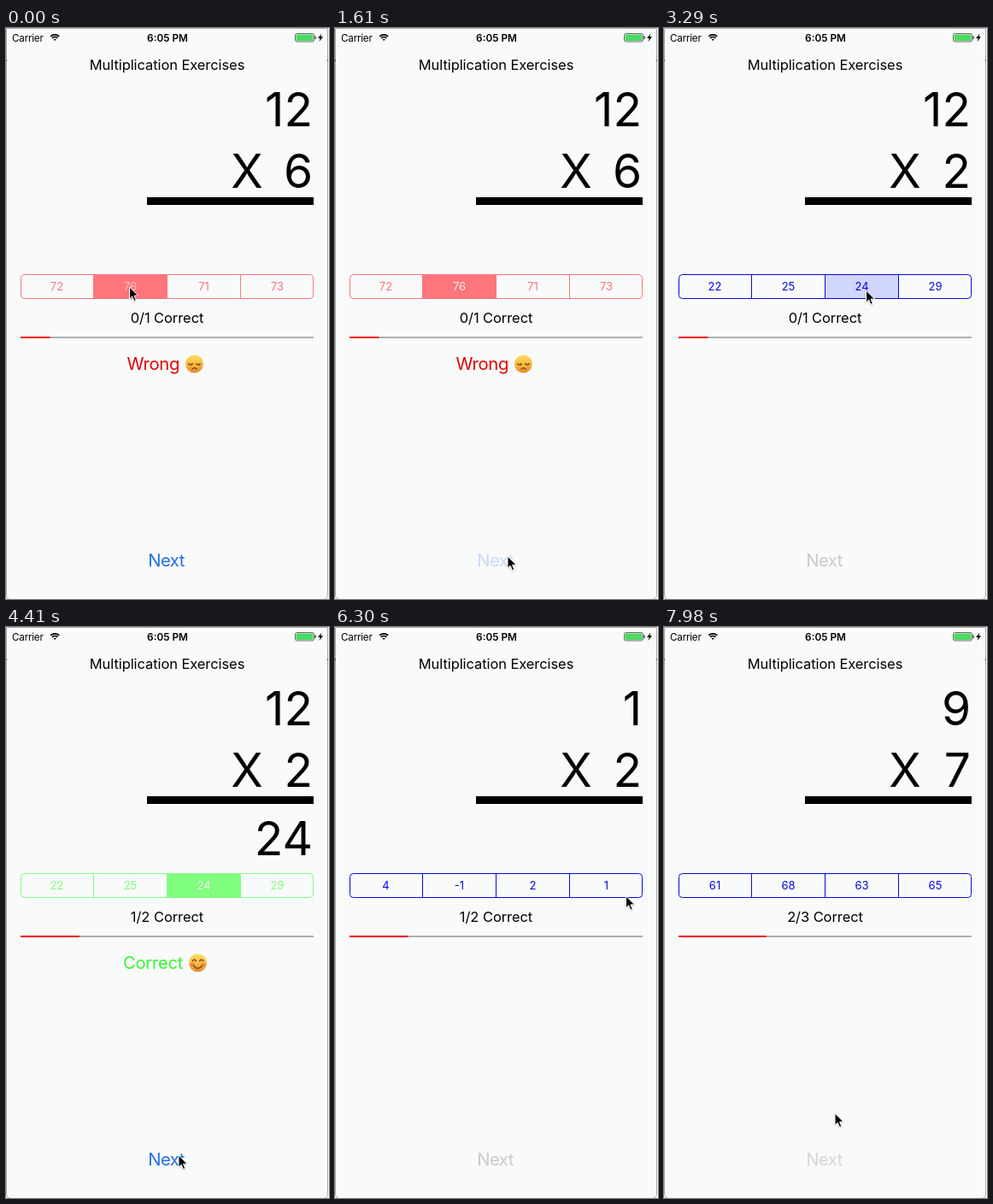
These frames come from a looping animation (378x668 px, 8 s). An HTML page with a canvas:

```html
<!DOCTYPE html>
<html lang="en">
<head>
<meta charset="utf-8">
<title>Multiplication Exercises</title>
<style>
  html, body { margin: 0; width: 100%; height: 100%; overflow: hidden; background: #fff; }
  canvas { display: block; width: 378px; height: 668px; }
</style>
</head>
<body>
<canvas id="stage"></canvas>
<script>
const W = 378, H = 668, LOOP = 8000;
const FONT = 'Inter, Roboto, sans-serif';
const PAPER = '#f9fbfb', BLUE = '#0808dc', RED = '#ff757b', GREEN = '#80ff80';
const LEFT = 17, RIGHT = 360, MID = 188.5, CELL = 86;
const PRESS_CHOICE = 210, PRESS_NEXT = 140;

const canvas = document.getElementById('stage');
const ctx = canvas.getContext('2d');
const ratio = window.devicePixelRatio || 1;
canvas.width = W * ratio;
canvas.height = H * ratio;

// Times are in ms; "picked" is the index of the chosen answer.
const rounds = [
  { start: 0, answer: 0, top: 12, bottom: 6, choices: [72, 76, 71, 73], picked: 1 },
  { start: 1680, answer: 3430, top: 12, bottom: 2, choices: [22, 25, 24, 29], picked: 2 },
  { start: 4830, answer: 6790, top: 1, bottom: 2, choices: [4, -1, 2, 1], picked: 2 },
  { start: 7700, answer: Infinity, top: 9, bottom: 7, choices: [61, 68, 63, 65], picked: 2 }
];
const isRight = r => r.choices[r.picked] === r.top * r.bottom;
const choiceX = i => 59.5 + CELL * i;

// Pointer stops; a stop with "until" rests there.
const atNext = { x: 202, y: 618 };
const path = [
  { at: 0, until: 140, x: choiceX(1) - 1, y: 303 },
  { at: 900, x: 330, y: 8 },
  { at: 1500, until: 1700, ...atNext },
  { at: 2120, x: 335, y: 9 },
  { at: 2500, x: 23, y: 290 },
  { at: 2850, x: 346, y: 120 },
  { at: 3180, until: 3440, x: choiceX(2) + 5, y: 307 },
  { at: 4150, until: 5070, ...atNext },
  { at: 5460, x: choiceX(3) + 12, y: 307 },
  { at: 6000, x: 92, y: 302 },
  { at: 6330, x: 346, y: 315 },
  { at: 6560, until: 6740, x: choiceX(2) - 12, y: 307 },
  { at: 7360, until: 7750, ...atNext },
  { at: LOOP, x: 200, y: 568 }
];

const clamp = v => Math.max(0, Math.min(1, v));

function pointerAt(t) {
  const i = path.findIndex(stop => stop.at > t);
  const a = path[i - 1], b = path[i], leave = a.until ?? a.at;
  const u = clamp((t - leave) / (b.at - leave)), k = u * u * (3 - 2 * u);
  return [a.x + (b.x - a.x) * k, a.y + (b.y - a.y) * k];
}

function text(value, x, y, size, { color = '#000', align = 'center', weight = 400, tracking = 0 } = {}) {
  ctx.font = `${weight} ${size}px ${FONT}`;
  ctx.letterSpacing = `${tracking * size}px`;
  ctx.textAlign = align;
  ctx.fillStyle = color;
  ctx.fillText(value, x, y);
}

function rect(x, y, w, h, color) {
  ctx.fillStyle = color;
  ctx.fillRect(x, y, w, h);
}

function roundRect(x, y, w, h, r) {
  ctx.beginPath();
  ctx.roundRect(x, y, w, h, r);
}

function polygon(points, color) {
  ctx.beginPath();
  points.forEach(([x, y]) => ctx.lineTo(x, y));
  ctx.closePath();
  ctx.fillStyle = color;
  ctx.fill();
}

function arc(x, y, r, from, to) {
  ctx.beginPath();
  ctx.arc(x, y, r, from * Math.PI, to * Math.PI);
  ctx.stroke();
}

function drawScreen() {
  rect(0, 0, W, H, '#fff');
  roundRect(0.5, 0.5, 376, H, [0, 0, 5, 5]);
  ctx.fillStyle = PAPER;
  ctx.fill();
  ctx.strokeStyle = '#a4a6a7';
  ctx.lineWidth = 1;
  ctx.stroke();
  rect(0, 37, 1, 2, '#555');
  rect(376, 37, 1, 2, '#555');
}

function drawStatusBar() {
  text('Carrier', 7, 16, 11.7, { align: 'left', tracking: -0.02 });
  text('6:05 PM', 189, 16, 11.8, { weight: 600 });

  ctx.strokeStyle = '#000';
  ctx.lineWidth = 1.7;
  for (const r of [1.4, 4.6, 7.4]) arc(57.2, 15.2, r, 1.26, 1.74);

  roundRect(338.5, 6.5, 22, 9.5, 2);
  ctx.strokeStyle = '#444';
  ctx.lineWidth = 0.8;
  ctx.stroke();
  roundRect(339.5, 7.5, 20, 7.5, 1);
  ctx.fillStyle = '#4cd964';
  ctx.fill();
  rect(361.4, 9.5, 1.4, 3.5, '#444');
  polygon([[369.5, 6.5], [365, 12], [367.7, 12], [366.5, 16], [371, 10.3], [368.3, 10.3]], '#000');
}

function drawProblem(round, solved) {
  const number = (value, y) => text(value, RIGHT - 1, y, 55, { align: 'right' });
  number(round.top, 115);
  number(round.bottom, 187);
  text('X', 282, 187, 55);
  rect(165, 198, RIGHT - 165, 9, '#000');
  if (solved) number(round.top * round.bottom, 267);
}

function drawChoices(round, t, answered, color) {
  const y = 288.5, h = 28;
  if (t >= round.answer - PRESS_CHOICE) {
    rect(16.5 + CELL * round.picked, y, CELL, h, answered ? color : '#d1d6ff');
  }
  ctx.strokeStyle = color;
  ctx.lineWidth = 1;
  roundRect(17.5, y, 342, h, 4);
  ctx.stroke();
  for (let i = 1; i < 4; i++) rect(16 + CELL * i, y, 1, h, color);

  const fade = 0.55 + 0.35 * clamp((t - round.answer) / 200);
  round.choices.forEach((choice, i) => {
    const chosen = answered && i === round.picked;
    text(choice, choiceX(i), 307, 13, { color: chosen ? `rgba(250,252,253,${fade})` : color });
  });
}

function drawScore(index, answered) {
  const tries = index + answered;
  const correct = rounds.slice(0, tries).filter(isRight).length;
  text(`${correct}/${tries} Correct`, MID, 345, 16.5, { tracking: -0.005 });
  rect(LEFT, 361, RIGHT - LEFT, 2, '#adafb0');
  rect(LEFT, 361, (RIGHT - LEFT) * tries / 10, 2, '#f5000a');
}

function drawFace(x, y, happy) {
  const skin = ctx.createLinearGradient(x, y - 10, x, y + 10);
  skin.addColorStop(0, '#ffdc62');
  skin.addColorStop(0.5, '#fbbd42');
  skin.addColorStop(1, '#e88b2c');
  ctx.beginPath();
  ctx.arc(x, y, 10.5, 0, 2 * Math.PI);
  ctx.fillStyle = skin;
  ctx.fill();

  ctx.lineWidth = 1.4;
  ctx.lineCap = 'round';
  for (const side of [-1, 1]) {
    if (happy) {
      ctx.beginPath();
      ctx.ellipse(x + side * 6.5, y + 2, 2.8, 2, 0, 0, 2 * Math.PI);
      ctx.fillStyle = 'rgba(245,90,60,.55)';
      ctx.fill();
    }
    ctx.strokeStyle = '#70421a';
    if (happy) arc(x + side * 4.2, y - 1.5, 2.2, 1.1, 1.9);
    else arc(x + side * 4.5, y - 1.5, 2.5, 0.15, 0.85);
  }
  if (happy) arc(x, y + 1, 5.2, 0.15, 0.85);
  else arc(x, y + 8, 3.2, 1.2, 1.8);
  ctx.lineCap = 'butt';
}

function drawResult(right) {
  const [word, x, faceX, color] = right
    ? ['Correct', 137, 224.5, '#35f535']
    : ['Wrong', 141.5, 220.5, '#e10000'];
  text(word, x, 400, 20.3, { align: 'left', color, tracking: -0.015 });
  drawFace(faceX, 393, right);
}

function drawNext(t, start, nextStart, answered) {
  const pressed = t >= nextStart - PRESS_NEXT;
  const color = !answered ? '#c8cacb' : pressed ? '#cbd9f8' : '#246fe6';
  ctx.globalAlpha = answered ? 1 : 0.3 + 0.7 * clamp((t - start) / 430);
  text('Next', MID - 1, 630, 20.3, { color, tracking: -0.025 });
  ctx.globalAlpha = 1;
}

function drawPointer(t) {
  ctx.save();
  ctx.translate(...pointerAt(t));
  ctx.shadowColor = 'rgba(0,0,0,.3)';
  ctx.shadowBlur = 2 * ratio;
  ctx.shadowOffsetY = ratio;
  ctx.lineJoin = 'round';
  polygon([[0, 0], [0, 14], [3.2, 11], [5.5, 16.4], [7.8, 15.4], [5.5, 10.2], [10, 10]], '#000');
  ctx.shadowColor = 'transparent';
  ctx.strokeStyle = '#fff';
  ctx.lineWidth = 1;
  ctx.stroke();
  ctx.restore();
}

function draw(t) {
  const index = rounds.findLastIndex(r => t >= r.start);
  const round = rounds[index];
  const nextStart = rounds[index + 1]?.start ?? Infinity;
  const answered = t >= round.answer, right = isRight(round);

  ctx.setTransform(ratio, 0, 0, ratio, 0, 0);
  drawScreen();
  drawStatusBar();
  text('Multiplication Exercises', MID, 49, 16.5, { tracking: -0.005 });
  drawProblem(round, answered && right);
  drawChoices(round, t, answered, !answered ? BLUE : right ? GREEN : RED);
  drawScore(index, answered);
  if (answered) drawResult(right);
  drawNext(t, round.start, nextStart, answered);
  drawPointer(t);
}

const began = performance.now();
function tick() {
  draw((performance.now() - began) % LOOP);
  requestAnimationFrame(tick);
}
tick();
</script>
</body>
</html>
```
